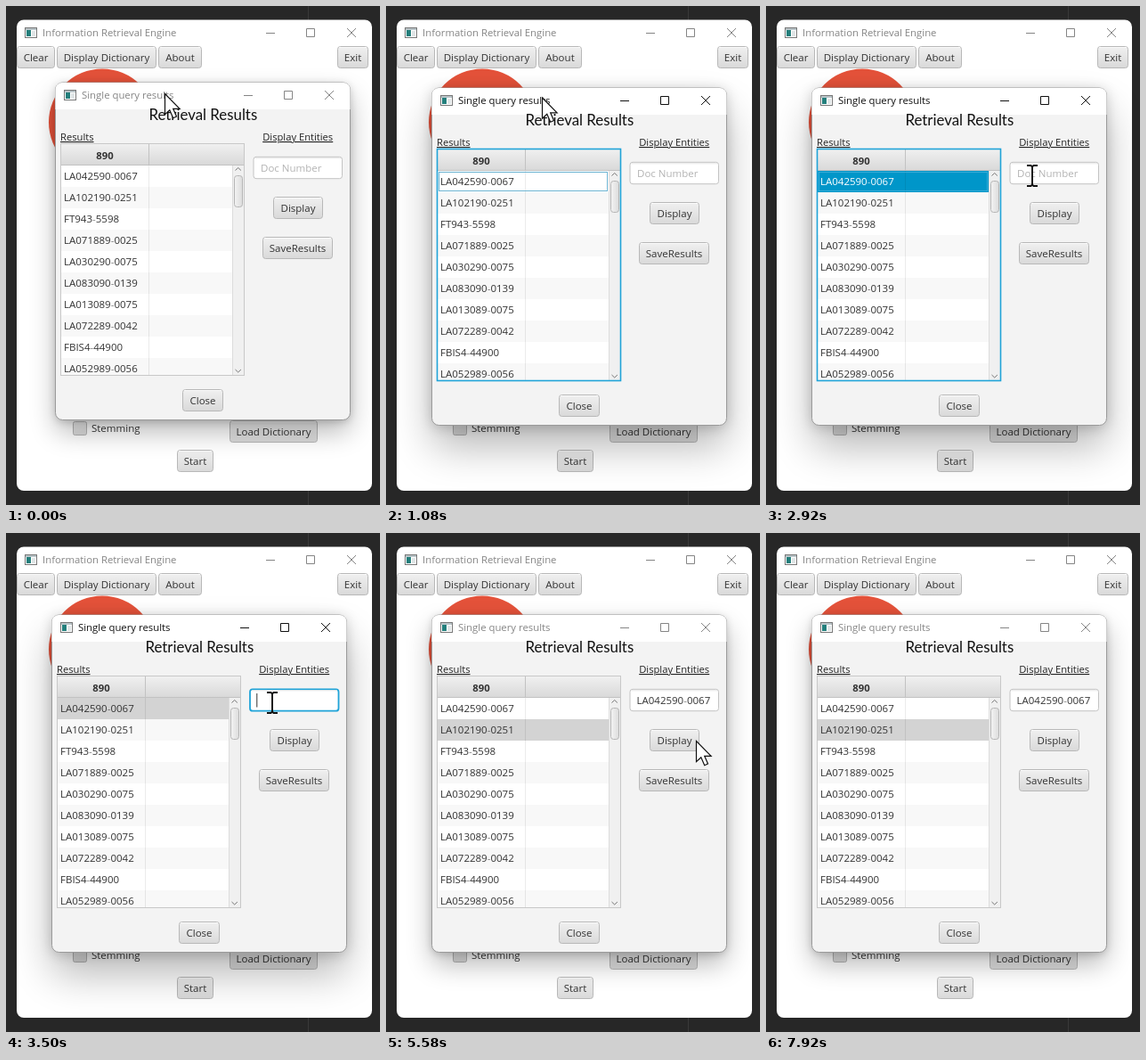
Write an HTML page that moves like this. It is 420 by 560 pixels and loops after 8000 ms.

```html
<!DOCTYPE html>
<html lang="en">
<head>
<meta charset="utf-8">
<title>Retrieval results</title>
<style>
  html, body { margin: 0; width: 100%; height: 100%; overflow: hidden; background: #272727; }
  svg { display: block; width: 420px; height: 560px; }
  text { font: 11.5px "Open Sans", "Noto Sans", sans-serif; fill: #333; white-space: pre; }
  .title { font-size: 11.35px; fill: currentColor; }
  .head { font: 16.85px Lato, "Open Sans", sans-serif; fill: #111; }
  .bold { font-weight: 700; font-size: 11.3px; }
  .under { text-decoration: underline; fill: #222; font-size: 11.2px; }
  .mid { text-anchor: middle; }
</style>
</head>
<body>
<svg id="stage" viewBox="0 0 420 560" xmlns="http://www.w3.org/2000/svg"></svg>
<script>
const LOOP = 8000, STEP = 1000 / 12;
const ROWS = ["LA042590-0067", "LA102190-0251", "FT943-5598", "LA071889-0025", "LA030290-0075",
  "LA083090-0139", "LA013089-0075", "LA072289-0042", "FBIS4-44900", "LA052989-0056"];

const rect = (x, y, w, h, fill, more = "") =>
  `<rect x="${x}" y="${y}" width="${w}" height="${h}" fill="${fill}" ${more}/>`;
const text = (x, y, s, cls = "", more = "") =>
  `<text x="${x}" y="${y}" class="${cls}" ${more}>${s}</text>`;
const path = (d, stroke, more = "") => `<path d="${d}" fill="none" stroke="${stroke}" ${more}/>`;
const paleDash = s => s.replace("-", '<tspan fill-opacity=".6">-</tspan>');

function button(x, y, w, h, label, id = "") {
  return rect(x + .5, y + .5, w - 1, h - 1, "url(#face)", `rx="3" stroke="#b8b8b8" ${id && `id="${id}"`}`) +
    path(`M${x + 2} ${y + 1.5}h${w - 4}`, "#fafafa") +
    text(x + w / 2, y + h / 2 + 4.3, label, "mid");
}

// Icon, caption and the three window controls of a title bar
function titleBar(x, y, caption, minX) {
  return rect(x + .5, y - 5.5, 13, 11, "#fff", 'stroke="#777"') +
    rect(x + 1, y - 5, 12, 2, "#b9c4c8") +
    rect(x + 2, y - 3, 5, 7, "#247f7c") +
    rect(x + 8, y - 2, 4, 6, "#dfe5e6") +
    text(x + 20, y + 4, caption, "title") +
    path(`M${minX} ${y + .5}h10M${minX + 45.5} ${y - 4.5}h9v9h-9zM${minX + 91} ${y - 5}l10 10m0-10l-10 10`, "currentColor");
}

function table() {
  let s = rect(57.5, 160.5, 206, 260, "#fff", 'stroke="#c8c8c8"') +
    rect(58, 161, 205, 23, "url(#face)") +
    path("M58 184.5H263M156.5 161V184", "#c2c2c2") +
    text(107, 178, "890", "bold mid");
  let rows = "";
  ROWS.forEach((name, i) => {
    const y = 185 + 24 * i;
    rows += rect(58, y, 192, 24, i % 2 ? "#f8f8f8" : "#fff", `id="row${i}"`) +
      text(61, y + 16.2, paleDash(name), "", `id="name${i}"`);
  });
  s += `<g clip-path="url(#rows)">${rows}${path("M156.5 185V420", "#000", 'opacity=".08"')}</g>` +
    rect(59.5, 186.5, 189, 21, "none", 'id="cell" stroke="#6db4d2"') +
    rect(250, 185, 13, 235, "#f0f0f0") + path("M250.5 185V420", "#dcdcdc") +
    rect(252.5, 196.5, 9, 35, "url(#thumb)", 'rx="3" stroke="#b5b5b5"') +
    path("M253.5 190.5l3.2-3 3.2 3M253.5 414l3.2 3 3.2-3", "#777") +
    rect(57.5, 160.5, 206, 260, "none", 'id="ring" stroke="#1fa3d8" stroke-width="1.6"');
  return s;
}

const field =
  rect(274, 175.3, 99.5, 24.4, "#fff", 'id="field" rx="3"') +
  path("M276 176.8H372", "#e6e6e6") +
  text(282, 192.2, "Doc Number", "", 'id="prompt" style="fill:#b3b3b3"') +
  text(281.5, 192.2, paleDash(ROWS[0]), "", 'id="value"') +
  path("M281.8 180V195.5", "#333", 'id="caret"');

const gradient = (id, x2, y2, a, b) =>
  `<linearGradient id="${id}" x2="${x2}" y2="${y2}"><stop stop-color="${a}"/><stop offset="1" stop-color="${b}"/></linearGradient>`;

// Popup shadow: a deep soft layer and a tight one near the edge
function shadow(id, drop, soft) {
  const blur = s => `style="filter:blur(${s}px)"`;
  return `<g id="${id}">${rect(52, 92 + drop, 330, 378, "#000", `rx="8" opacity=".28" ${blur(soft)}`)}
    ${rect(52, 94, 330, 378, "#000", `rx="8" opacity=".2" ${blur(soft / 3)}`)}</g>`;
}

document.getElementById("stage").innerHTML = `
  <defs>
    ${gradient("face", 0, 1, "#f0f0f0", "#d9d9d9")}
    ${gradient("dark", 0, 1, "#dedede", "#c6c6c6")}
    ${gradient("thumb", 1, 0, "#f3f3f3", "#dcdcdc")}
    <clipPath id="rows"><rect x="58" y="185" width="192" height="235"/></clipPath>
    <clipPath id="frame"><rect x="51.5" y="92" width="331" height="378.5" rx="8"/></clipPath>
  </defs>
  ${rect(0, 0, 420, 560, "#272727")}
  ${path("M339.5 0V560", "#393939")}
  ${rect(12, 15.5, 399, 528.5, "#fff", 'rx="8"')}
  <g color="#858585">${titleBar(21, 30, "Information Retrieval Engine", 292)}</g>
  ${button(12, 45, 43, 25, "Clear")}
  ${button(57, 45, 112, 25, "Display Dictionary")}
  ${button(171, 45, 49, 25, "About")}
  ${button(372, 45, 35, 25, "Exit")}
  <circle cx="108" cy="130.5" r="60" fill="#e4523a"/>
  ${rect(75.5, 466.5, 15, 15, "url(#face)", 'rx="2" stroke="#b4b4b4"')}
  ${text(96, 478.4, "Stemming")}
  ${button(251, 465, 99, 25, "Load Dictionary")}
  ${button(192, 498, 41, 25, "Start")}
  <g id="popup">
    ${shadow("near", 14, 15)}
    ${shadow("far", 25, 23)}
    ${rect(51.5, 92, 331, 378.5, "#f3f3f3", 'rx="8" stroke="#9a9a9a"')}
    <g clip-path="url(#frame)">${rect(51, 92, 332, 30, "#fff")}</g>
    <g id="bar">${titleBar(61, 106, "Single query results", 263)}</g>
    ${text(217.3, 134.3, "Retrieval Results", "head mid")}
    ${text(57, 157, "Results", "under")}
    ${text(323.7, 157, "Display Entities", "under mid")}
    ${table()}
    ${field}
    ${button(296, 220, 56, 25, "Display", "display")}
    ${button(284, 265, 79, 25, "SaveResults")}
    ${button(194, 436, 46, 25, "Close")}
  </g>
  <path id="arrow" d="M0 0V23.2L5.3 18.2L9.2 27.2L13 25.5L9.2 16.8H16.6Z" fill="#fff" stroke="#111" stroke-width="1.2"/>
  <path id="beam" d="M-6-11.5h4.5l1.5 1.5l1.5-1.5h4.5M0-10V10M-6 11.5h4.5l1.5-1.5l1.5 1.5h4.5" fill="none" stroke="#111" stroke-width="1.9"/>`;

const el = id => document.getElementById(id);
const attr = (id, name, value) => el(id).setAttribute(name, value);
const show = (id, on) => attr(id, "visibility", on ? "visible" : "hidden");

// Smooth progress from a to b
function ease(t, a, b) {
  const k = Math.min(1, Math.max(0, (t - a) / (b - a)));
  return k * k * (3 - 2 * k);
}

// Pointer stops: time, x, y
const MOVES = [[170, 178.5, 98.5], [583, 175.5, 103], [1167, 175.5, 103], [1583, 120, 198],
  [2167, 120, 198], [2583, 299, 190.5], [4800, 299, 190.5], [4910, 387, 226], [5083, 378, 228],
  [5500, 348.5, 233.5], [5833, 348.5, 233.5], [6333, 347.5, 233]];

function pointer(t) {
  const i = MOVES.findIndex(m => m[0] > t);
  if (i === 0) return MOVES[0].slice(1);
  if (i < 0) return MOVES[MOVES.length - 1].slice(1);
  const [a, x, y] = MOVES[i - 1], [b, x2, y2] = MOVES[i], k = ease(t, a, b);
  return [x + (x2 - x) * k, y + (y2 - y) * k];
}

function draw(t) {
  const typing = t >= 3330 && t < 4580, filled = t >= 4580;
  const active = t >= 250 && t < 4580 || t >= 6330 && t < 6490;
  const listFocus = t >= 250 && t < 3330;
  const picked = t < 1750 ? -1 : filled ? 1 : 0;

  const left = 1 - ease(t, 170, 583);
  attr("popup", "transform", `translate(${Math.round(4 * left)} ${Math.round(-6 * left)})`);
  show("far", active);
  show("near", !active);
  attr("bar", "color", active ? "#111" : "#858585");

  show("ring", listFocus);
  show("cell", listFocus);
  attr("cell", "stroke", picked < 0 ? "#6db4d2" : "#36abd6");
  for (const i of [0, 1]) {
    const on = i === picked;
    attr("row" + i, "fill", on ? (listFocus ? "#0096c9" : "#d3d3d3") : i ? "#f8f8f8" : "#fff");
    el("name" + i).style.fill = on && listFocus ? "#fff" : "#333";
  }

  attr("field", "stroke", typing ? "#1fa3d8" : "#c3c3c3");
  attr("field", "stroke-width", typing ? 1.8 : 1);
  show("prompt", t < 3330);
  show("value", filled);
  show("caret", typing && (t - 3330) % 1000 < 500);
  attr("display", "fill", t >= 6330 && t < 7330 ? "url(#dark)" : "url(#face)");

  const [x, y] = pointer(t);
  const inField = t < 4580 && x > 274 && y > 175 && y < 200;
  const present = t < 3830 || t >= 4910 && t < 7330;
  for (const id of ["arrow", "beam"]) {
    attr(id, "transform", `translate(${x} ${y})`);
    show(id, present && inField === (id === "beam"));
  }
}

// Twelve pictures a second, every third of six repeats the one before
function held(t) {
  const n = Math.floor((t + 8) / STEP);
  return (n % 6 === 2 ? n - 1 : n) * STEP;
}

const start = performance.now();
function tick(now) {
  draw(held(Math.max(0, now - start) % LOOP) % LOOP);
  requestAnimationFrame(tick);
}
draw(0);
requestAnimationFrame(tick);
</script>
</body>
</html>
```
